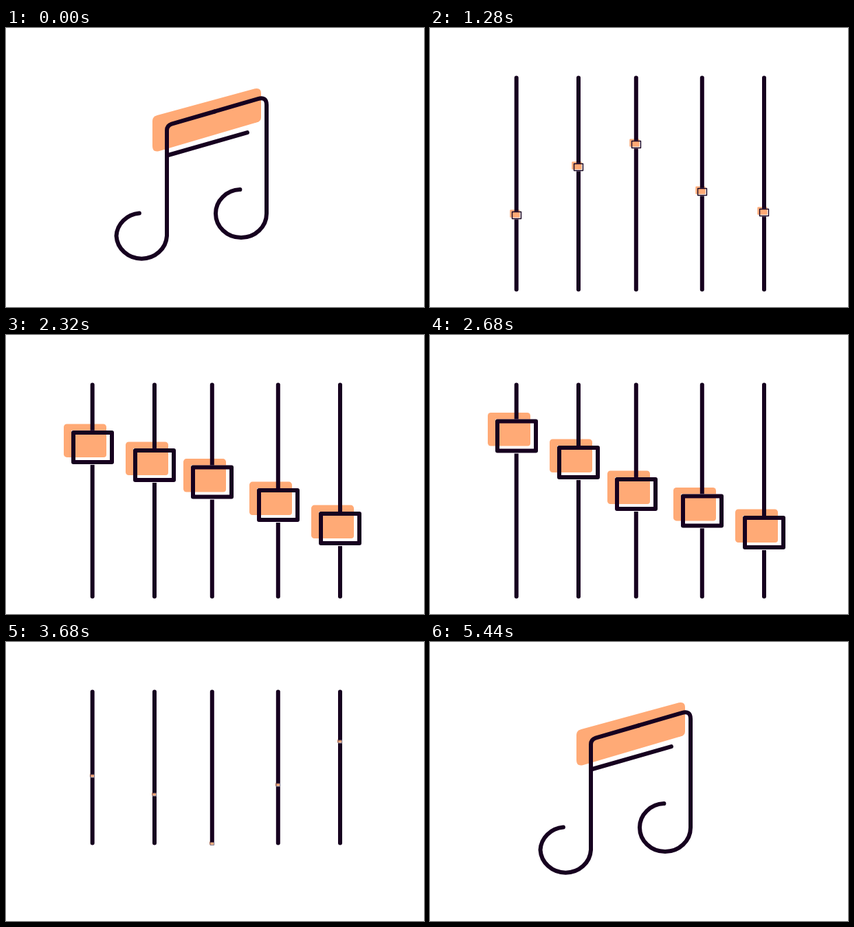
An HTML page without scripts that plays this animation: 608x406 px, repeating every 5.52 s.

```html
<!DOCTYPE html>
<html lang="en">
<head>
<meta charset="utf-8">
<title>Note and mixer</title>
<style>
@property --a { syntax: "<length>"; inherits: false; initial-value: 0px; }
@property --b { syntax: "<length>"; inherits: false; initial-value: 0px; }

html, body { margin: 0; width: 100%; height: 100%; overflow: hidden; background: #fff; }
svg { display: block; width: 100vw; height: 100vh; }

.ink { fill: none; stroke: #16001f; stroke-width: 6; stroke-linecap: round; stroke-linejoin: round; }
.tint { fill: #ffaa76; }

/* each stroke shows the stretch of its path from --a to --b */
.trim {
  stroke-dasharray: calc(var(--b) - var(--a)) 4000px;
  stroke-dashoffset: calc(0px - var(--a));
  animation: 5520ms linear infinite;
}
.left { animation-name: left; }
.right { animation-name: right; }
.mid { animation-name: mid; }
.outer { animation-name: outer; }
.last { animation-name: last; }
.under { animation-name: under; }
.loop { animation-name: loop; }

@keyframes left {
  0%, 1.09% { --a: 475px; --b: 874px; animation-timing-function: cubic-bezier(.4,0,.7,.8); }
  13.04% { --a: 77px; --b: 605px; animation-timing-function: cubic-bezier(.3,.55,.5,1); }
  23.19% { --a: 0px; --b: 308px; }
  63.04% { --a: 0px; --b: 308px; animation-timing-function: ease-in; }
  67.39% { --a: 0px; --b: 190px; animation-timing-function: ease-out; }
  75.36% { --a: 0px; --b: 0px; }
  75.37%, 85.5% { --a: 2000px; --b: 2000px; }
  85.51% { --a: 643px; --b: 643px; }
  88%, 91.3% { --a: 643px; --b: 874px; }
  91.31%, 100% { --a: 475px; --b: 874px; }
}
@keyframes right {
  0%, 1.09% { --a: 508px; --b: 918px; animation-timing-function: cubic-bezier(.4,0,.7,.8); }
  13.04% { --a: 82px; --b: 625px; animation-timing-function: cubic-bezier(.3,.55,.5,1); }
  23.19% { --a: 0px; --b: 308px; }
  63.04% { --a: 0px; --b: 308px; animation-timing-function: ease-in; }
  67.39% { --a: 0px; --b: 190px; animation-timing-function: ease-out; }
  75.36% { --a: 0px; --b: 0px; }
  75.37%, 87.99% { --a: 2000px; --b: 2000px; }
  88% { --a: 918px; --b: 918px; animation-timing-function: ease-out; }
  91.6%, 100% { --a: 508px; --b: 918px; }
}
@keyframes mid {
  0%, 11.4% { --a: 2000px; --b: 2000px; }
  11.41% { --a: 0px; --b: 0px; animation-timing-function: ease-in; }
  13.04% { --a: 0px; --b: 16px; animation-timing-function: cubic-bezier(.4,.3,.4,1); }
  22% { --a: 0px; --b: 308px; }
  63.04% { --a: 0px; --b: 308px; animation-timing-function: ease-in; }
  67.39% { --a: 118px; --b: 308px; animation-timing-function: ease-out; }
  75.36% { --a: 308px; --b: 308px; }
  75.37%, 100% { --a: 2000px; --b: 2000px; }
}
@keyframes outer {
  0%, 12.6% { --a: 2000px; --b: 2000px; }
  12.61%, 13.04% { --a: 0px; --b: 0px; animation-timing-function: cubic-bezier(.5,0,.3,1); }
  22.8% { --a: 0px; --b: 308px; }
  63.04% { --a: 0px; --b: 308px; animation-timing-function: ease-in; }
  67.39% { --a: 118px; --b: 308px; animation-timing-function: ease-out; }
  75.36% { --a: 308px; --b: 308px; }
  75.37%, 100% { --a: 2000px; --b: 2000px; }
}
@keyframes last {
  0%, 12.6% { --a: 2000px; --b: 2000px; }
  12.61%, 13.04% { --a: 0px; --b: 0px; animation-timing-function: cubic-bezier(.5,0,.3,1); }
  22.8% { --a: 0px; --b: 308px; }
  63.04% { --a: 0px; --b: 308px; animation-timing-function: ease-in; }
  67.39% { --a: 118px; --b: 308px; }
  67.4%, 100% { --a: 2000px; --b: 2000px; }
}
@keyframes under {
  0%, 1.09% { --a: 0px; --b: 119.6px; animation-timing-function: ease-in-out; }
  13.04% { --a: 116px; --b: 119.6px; }
  13.5% { --a: 119.6px; --b: 119.6px; }
  13.51%, 87.4% { --a: 2000px; --b: 2000px; }
  87.41% { --a: 0px; --b: 0px; animation-timing-function: ease-out; }
  91.3%, 100% { --a: 0px; --b: 119.6px; }
}
@keyframes loop {
  0%, 67.39% { --a: 2000px; --b: 2000px; }
  67.4% { --a: 0px; --b: 189.5px; }
  71.5% { --a: 0px; --b: 250px; animation-timing-function: cubic-bezier(.4,.1,.7,.9); }
  81.88% { --a: 641px; --b: 679px; animation-timing-function: ease-out; }
  87% { --a: 828px; --b: 925px; animation-timing-function: ease-out; }
  91.3% { --a: 828px; --b: 998px; }
  91.31%, 100% { --a: 2000px; --b: 2000px; }
}

.bar { transform-origin: 371px 112px; animation: bar 5520ms infinite; }
@keyframes bar {
  0%, 1.09% { transform: none; animation-timing-function: ease-in; }
  9%, 87.4% { transform: scale(0); animation-timing-function: ease-out; }
  91.3%, 100% { transform: none; }
}

.knob { animation: slide 5520ms ease-in-out infinite, pop 5520ms ease-out infinite; }
.k1 { --x: 126px; --y1: 272.5px; --y2: 163.5px; --y3: 145px; --y4: 182.5px; --y5: 195px; }
.k2 { --x: 216px; --y1: 202.5px; --y2: 189.5px; --y3: 184px; --y4: 212px; --y5: 222px; }
.k3 { --x: 300px; --y1: 169.5px; --y2: 214px; --y3: 230px; --y4: 257px; --y5: 293.5px; }
.k4 { --x: 396px; --y1: 238.5px; --y2: 247.5px; --y3: 258px; --y4: 219px; --y5: 208px; }
.k5 { --x: 486px; --y1: 268.5px; --y2: 281.5px; --y3: 293.5px; --y4: 183.5px; --y5: 145px; }
@keyframes slide {
  0%, 30.43% { translate: var(--x) var(--y1); animation-timing-function: cubic-bezier(.5,0,.6,.9); }
  42.03% { translate: var(--x) var(--y2); animation-timing-function: ease-out; }
  46.38% { translate: var(--x) var(--y3); animation-timing-function: cubic-bezier(.5,0,.7,.8); }
  56.52% { translate: var(--x) var(--y4); animation-timing-function: ease-out; }
  60.87%, 100% { translate: var(--x) var(--y5); }
}
@keyframes pop {
  0%, 22.5% { scale: 0; }
  27.5% { scale: 1.04; }
  29.7%, 61.5% { scale: 1; animation-timing-function: ease-in; }
  67%, 100% { scale: 0; }
}
</style>
</head>
<body>
<svg viewBox="0 0 608 406">
  <defs>
    <rect id="back" class="tint" x="-42" y="-34" width="62" height="48.5" rx="4.5"/>
    <g id="front">
      <rect x="-31" y="-24.5" width="62" height="50" fill="#fff"/>
      <rect class="tint" x="-28" y="-21.5" width="48" height="36" rx="4"/>
      <rect class="ink" x="-28" y="-21.5" width="56" height="43"/>
    </g>
  </defs>

  <path class="bar tint" d="M220 127 L362 88.3 Q371 86.500 371 95 V130 Q371 135.500 365 137.300 L223 179 Q213 181.500 213 172 V135 Q213 129 220 127Z"/>

  <use class="knob k1" href="#back"/>
  <use class="knob k2" href="#back"/>
  <use class="knob k3" href="#back"/>
  <use class="knob k4" href="#back"/>
  <use class="knob k5" href="#back"/>

  <g class="ink">
    <path class="trim left" d="M216 72.500 V382 A9 9 0 0 0 234 382 V302.500 A36.800 35 0 0 0 160.500 302.500 A36.800 35 0 0 0 234 302.500 V149 Q234 142 241 139.700 L303.500 121.500"/>
    <path class="trim right" d="M395.800 72.500 V383 A8.400 8.500 0 0 1 379 383 V270 A37 35 0 0 0 305 270 A37 35 0 0 0 379 270 V112 Q379 99.500 366.500 103.200 L303.500 121.500"/>
    <path class="trim under" d="M236 185 L351 152"/>
    <path class="trim outer" d="M125.700 380.500 V72.500"/>
    <path class="trim mid" d="M299.800 380.500 V72.500"/>
    <path class="trim last" d="M486 380.500 V72.500"/>
    <path class="trim loop" d="M486 72.500 V262 A22 24 0 0 0 530 262 V150 C530 110 500 95 460 95 C400 95 350 135 306 154 L271 169 C245 180 234 195 234 220 V302.500 A36.800 35 0 0 1 160.500 302.500 A36.800 35 0 0 1 197.300 267.500"/>
  </g>

  <use class="knob k1" href="#front"/>
  <use class="knob k2" href="#front"/>
  <use class="knob k3" href="#front"/>
  <use class="knob k4" href="#front"/>
  <use class="knob k5" href="#front"/>
</svg>
</body>
</html>
```
